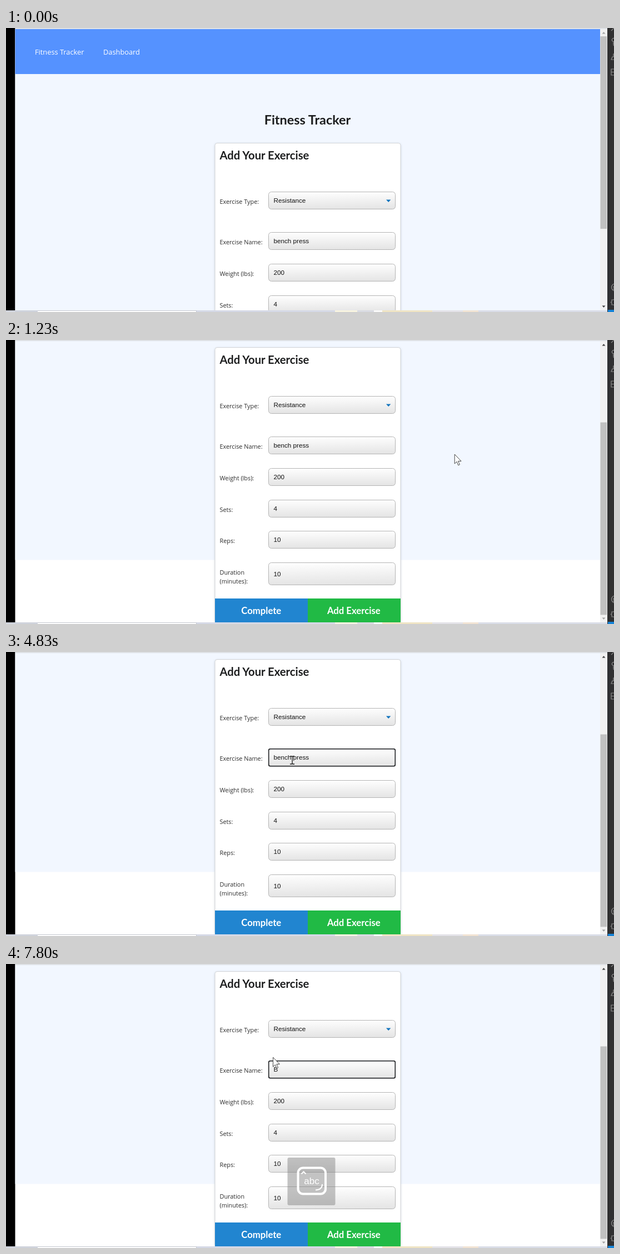
An HTML page for the animation above (8000 ms loop, 1094 by 512 pixels).

```html
<!DOCTYPE html>
<html lang="en">
<head>
<meta charset="utf-8">
<title>Exercise form</title>
<style>
  html, body { margin: 0; width: 100%; height: 100%; overflow: hidden; background: #fff; }
  svg { display: block; width: 1094px; height: 512px; }
  text { white-space: pre; }
  .nav { font: 12.8px "Open Sans", sans-serif; fill: #fff; }
  .label { font: 10.85px "Open Sans", sans-serif; fill: #2b2b2b; }
  .value { font: 11.7px "Liberation Sans", Arial, sans-serif; fill: #111; }
  .head { font: bold 23.4px Lato, sans-serif; fill: #1c1d1e; }
  .title { font: bold 20.2px Lato, sans-serif; fill: #1c1d1e; }
  .button { font: bold 16.7px Lato, sans-serif; fill: #fff; }
  .mid { text-anchor: middle; }
  .key { font: 17px "Liberation Sans", Arial, sans-serif; fill: #fff; }
  .box { fill: url(#shade); stroke: #b4b4b4; }
  .icon { fill: none; stroke: #8c8c8c; stroke-width: 1.2; }
</style>
</head>
<body>
<svg id="stage" viewBox="0 0 1094 512">
  <defs>
    <linearGradient id="shade" x2="0" y2="1">
      <stop stop-color="#fefefe"/><stop offset="1" stop-color="#e4e4e4"/>
    </linearGradient>
    <clipPath id="view"><rect x="16.5" y="2" width="1052.5" height="507"/></clipPath>
    <filter id="soft" x="-10%" y="-10%" width="120%" height="120%"><feGaussianBlur stdDeviation="2"/></filter>
  </defs>

  <rect width="1094" height="512" fill="#000"/>
  <rect x="16.5" width="1065.5" height="509" fill="#fff"/>
  <rect x="16.5" width="1065.5" height="2" fill="#dfe2e6"/>

  <g clip-path="url(#view)">
    <g id="page">
      <rect x="16" width="1053" height="590.5" fill="#f2f7ff"/>
      <rect x="16" width="1053" height="83" fill="#5592ff"/>
      <text class="nav" x="52" y="48">Fitness Tracker</text>
      <text class="nav" x="175" y="48">Dashboard</text>
      <text class="head mid" x="542.5" y="173.5">Fitness Tracker</text>
      <rect x="376" y="209" width="334" height="496" rx="4" fill="#8a94a2" opacity=".4" filter="url(#soft)"/>
      <rect x="376" y="207.5" width="334" height="496" rx="4" fill="#fff" stroke="#d2d4d7"/>
      <text class="title" x="384.5" y="237">Add Your Exercise</text>
      <g id="form"></g>
      <path d="M684 309.5h8.4l-4.2 4.4z" fill="#0e73bd"/>
      <rect x="376" y="660" width="167" height="43" fill="#2185d0"/>
      <rect x="543" y="660" width="167" height="43" fill="#21ba45"/>
      <text class="button mid" x="459.3" y="688">Complete</text>
      <text class="button mid" x="625.8" y="688">Add Exercise</text>
    </g>
    <rect id="ring" x="471.2" y="99.7" width="231" height="33.6" rx="5" fill="none" stroke="#74a9f7" stroke-width="2.6"/>
    <rect id="focus" x="472.7" y="174.7" width="227.6" height="31" rx="2.5" fill="none" stroke="#15171a" stroke-width="1.5"/>
    <g id="menu">
      <rect x="473" y="135" width="228" height="80" fill="#555" opacity=".5" filter="url(#soft)"/>
      <rect x="473" y="133" width="227.5" height="80.5" fill="#fff" stroke="#767676"/>
      <rect x="473.5" y="159.5" width="226.5" height="26.5" fill="#1e90ff"/>
      <text class="value" x="482" y="150" style="fill:#757575">Select Exercise Type</text>
      <text class="value" x="482" y="177" style="fill:#fff">Resistance</text>
      <text class="value" x="482" y="203">Cardio</text>
    </g>
    <rect id="caret" y="184" width="1" height="13" fill="#111"/>
  </g>

  <rect x="1069" y="2" width="13" height="507" fill="#f1f1f1"/>
  <rect id="thumb" x="1069.5" y="15" width="11.5" height="347" fill="#c1c1c1"/>
  <path id="up" d="M1072.5 10.5h6l-3-3.5z"/>
  <path id="down" d="M1072.5 500.5h6l-3 3.5z"/>

  <g id="task"></g>
  <path d="M57 509.5H342.5V512" fill="none" stroke="#c4c7ce"/>
  <rect x="1082" width="12" height="512" fill="#303031"/>
  <rect x="1083" y="508" width="11" height="4" fill="#1583d7"/>
  <g class="icon">
    <path d="M1089 5l5-5M1095 19a3 3 0 1 0 0 5M1093 24v5M1095 28a2 2 0 1 0 0 4"/>
    <path d="M1095 46l-2 1v5M1089 57h6v-5h-4z"/>
    <path d="M1095 74h-6v11h6M1089 79.5h6"/>
    <circle cx="1096" cy="467.5" r="6.5"/><path d="M1095 465a2 2 0 0 0 0 4l-3 3"/>
    <path d="M1095 489l-2 1-3 0v3l-1.5 1.5 1.5 1.5v3h3l2 1"/>
  </g>

  <g id="osd">
    <rect x="506.5" y="349" width="86" height="86" rx="3" fill="#808080" fill-opacity=".47"/>
    <rect x="525.5" y="367.5" width="49.5" height="47" rx="9" fill="none" stroke="#fff" stroke-width="4"/>
    <path d="M531.5 378.500l4-4 4 4M569 397q0 10-12 10.500" fill="none" stroke="#fff" stroke-width="2"/>
    <text id="caps" class="key mid" x="550" y="396.5"></text>
  </g>

  <circle id="halo" r="10.3" fill="#fff23c" opacity=".75"/>
  <g id="pointer">
    <path id="arrow" d="M.5 .2V17.200L4.400 13.500 7 20 9.600 18.900 6.900 12.600H12.300Z" fill="#fff" stroke="#333" stroke-width=".9"/>
    <path id="beam" d="M-4-7H-1L0-6 1-7H4M0-6V6M-4 7H-1L0 6 1 7H4" fill="none" stroke="#1a1a1a" stroke-width="1.3"/>
  </g>
</svg>

<script>
const $ = id => document.getElementById(id);
const LOOP = 8000, TEXT_X = 481.5;

// label, value, top, height
const fields = [
  ["Exercise Type:", "Resistance", 295.5, 31],
  ["Exercise Name:", "bench press", 368.5, 31],
  ["Weight (lbs):", "200", 425.5, 31],
  ["Sets:", "4", 482.5, 31],
  ["Reps:", "10", 538.5, 31],
  ["Duration|(minutes):", "10", 595.5, 40]
];

$("form").innerHTML = fields.map(([label, value, y, h], i) => {
  const lines = label.split("|").map((s, n) =>
    `<text class="label" x="384.5" y="${y + 21 + n * 16}">${s}</text>`).join("");
  const mark = i === 1 ? `<rect id="mark" y="378" height="13" fill="#b2b2b2"/>` : "";
  const base = y + h / 2 + 4;
  return `${lines}<rect class="box" x="472.5" y="${y}" width="228" height="${h}" rx="5"/>${mark}
    <text class="value" id="value${i}" x="${TEXT_X}" y="${base}">${value}</text>`;
}).join("");

// taskbar slice: x, colour up to the next x
$("task").innerHTML = [
  [0, "#cfd3dc"], [57, "#fff"], [342, "#d5d9e6"], [592, "#f7f3e0"], [632, "#d9dbe2"],
  [662, "#fafafa"], [677, "#efe4c4"], [767, "#e3e2e8"], [822, "#f1e3d3"], [850, "#dadde8"]
].map(([x, c]) => `<rect x="${x}" y="509" width="${1082 - x}" height="3" fill="${c}"/>`).join("");

const scrollKeys = [[80, 0], [740, 159], [880, 194]];
const pointerKeys = [
  [120, 832, 160], [740, 820, 180], [880, 823, 186], [1229, 823, 186], [1230, 807, 205],
  [1430, 752, 370], [1560, 700, 414], [1740, 640, 270], [1960, 590, 109], [2300, 590, 109],
  [2620, 579, 113], [3040, 579, 113], [3400, 560, 170], [3600, 555, 178], [3900, 515, 195],
  [4830, 515, 195], [5110, 535, 190], [5200, 535, 190], [5600, 553, 187], [6040, 548, 190],
  [6500, 459, 201], [6730, 480, 168]
];

function at(keys, t, col = 1) {
  if (t <= keys[0][0]) return keys[0][col];
  for (let i = 1; i < keys.length; i++) {
    const a = keys[i - 1], b = keys[i];
    if (t < b[0]) return a[col] + (b[col] - a[col]) * (t - a[0]) / (b[0] - a[0]);
  }
  return keys[keys.length - 1][col];
}

const show = (id, on) => { $(id).style.display = on ? "" : "none"; };
const between = (t, a, b) => t >= a && t < b;
const set = (id, attrs) => { for (const k in attrs) $(id).setAttribute(k, attrs[k]); };

const name = $("value1");
const edge = n => TEXT_X + (n ? name.getSubStringLength(0, n) : 0);

// Left edge of the dragged selection, snapped to the nearest letter gap
function snap(x) {
  let best = 0;
  for (let n = 1; n <= name.textContent.length; n++)
    if (Math.abs(edge(n) - x) < Math.abs(edge(best) - x)) best = n;
  return edge(best);
}

function draw(t) {
  const scroll = Math.round(at(scrollKeys, t));
  set("page", { transform: `translate(0 ${-scroll})` });
  set("thumb", { y: 15 + scroll * 133.5 / 194 });
  set("up", { fill: scroll > 0 ? "#404040" : "#a3a3a3" });
  set("down", { fill: scroll < 194 ? "#404040" : "#a3a3a3" });

  const x = at(pointerKeys, t), y = at(pointerKeys, t, 2);
  const drag = between(t, 6040, 6600);
  const menu = between(t, 2760, 3600);
  const overText = x > 472 && x < 701 && fields.slice(1).some(f =>
    between(y + scroll, f[2], f[2] + f[3]));
  const beam = drag || overText && !menu;
  show("pointer", t >= 120);
  show("arrow", !beam);
  show("beam", beam);
  set("pointer", { transform: `translate(${x.toFixed(2)} ${y.toFixed(2)})` });
  show("halo", between(t, 2760, 2890) || between(t, 4300, 4360) || drag);
  set("halo", { cx: x, cy: y + 0.5 });

  show("menu", menu);
  show("ring", between(t, 2760, 4300));
  show("focus", t >= 4300);

  const typed = t >= 7300;
  name.textContent = typed ? "B" : fields[1][1];
  const marked = between(t, 6040, 7300);
  show("mark", marked);
  if (marked) {
    const left = snap(drag ? x : 0);
    set("mark", { x: left, width: edge(fields[1][1].length) - left });
  }
  const blink = typed ? t < 7800 : between(t, 4300, 6040) && (t - 4330 + 1000) % 1000 < 500;
  show("caret", blink);
  set("caret", { x: Math.round(edge(typed ? 1 : 5)) });

  show("osd", t >= 7200);
  $("caps").textContent = t < 7400 ? "ABC" : "abc";
}

const start = performance.now();
function tick(now) {
  draw(Math.max(0, now - start) % LOOP);
  requestAnimationFrame(tick);
}
draw(0);
requestAnimationFrame(tick);
</script>
</body>
</html>
```
